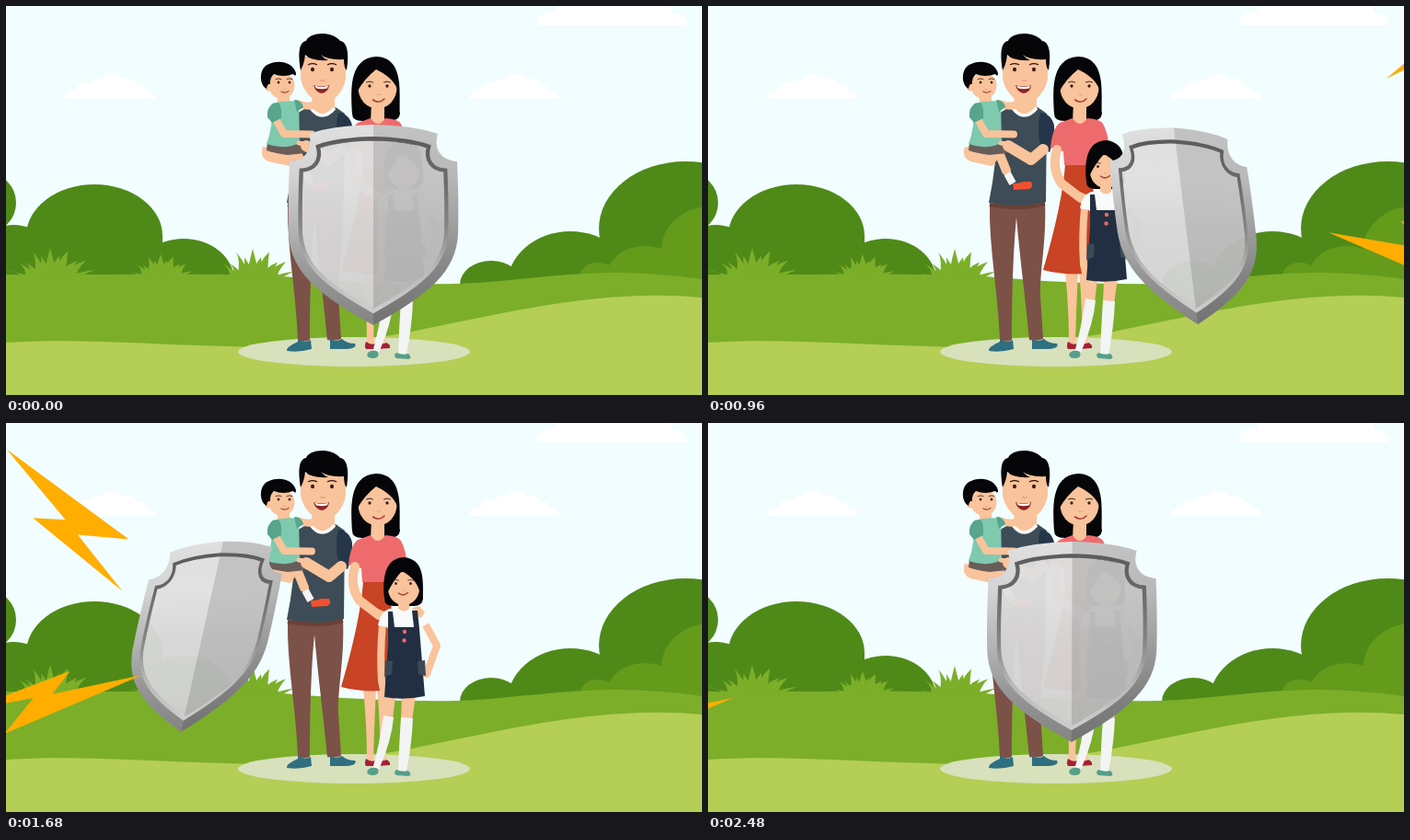
An HTML page with a canvas for the animation above (2.52 s loop, 756 by 423 pixels).

```html
<!DOCTYPE html>
<html lang="en">
<head>
<meta charset="utf-8">
<title>Family behind a shield</title>
<style>
html, body { margin: 0; width: 100%; height: 100%; overflow: hidden; background: #f1fdff; }
canvas { display: block; width: 756px; height: 423px; }
</style>
</head>
<body>
<canvas id="stage" width="756" height="423"></canvas>
<script>
const W = 756, H = 423, LOOP = 2520, STEP = 40;
const ctx = document.getElementById('stage').getContext('2d');
const scene = document.createElement('canvas');
scene.width = W;
scene.height = H;
const g = scene.getContext('2d');

const SKIN = '#f9c39b', BLACK = '#060608', WHITE = '#fcfdfd';
const BUSH = '#4f8a18', BUSH_LIGHT = '#659b1b', GRASS = '#7cae29', FIELD = '#b5ce56';

function shape(color, path) {
  g.fillStyle = color;
  g.fill(new Path2D(path));
}
function line(color, width, path, cap = 'round') {
  g.strokeStyle = color;
  g.lineWidth = width;
  g.lineCap = cap;
  g.lineJoin = 'round';
  g.stroke(new Path2D(path));
}
function oval(color, x, y, rx, ry = rx, turn = 0) {
  g.fillStyle = color;
  g.beginPath();
  g.ellipse(x, y, rx, ry, turn, 0, Math.PI * 2);
  g.fill();
}

// ---------- landscape ----------

function cloud(x, y, s) {
  g.save();
  g.translate(x, y);
  g.scale(s, s);
  shape('#fff', 'M-49 0C-49-7-43-10-37-9C-36-16-29-20-22-17C-19-22-14-23-10-21' +
    'C-6-29 9-29 14-21C20-25 28-20 30-15C35-17 39-13 39-8C45-9 49-5 49 0Z');
  g.restore();
}

function tuft(x, y, w, h) {
  for (let i = 0; i <= 10; i++) {
    const a = i / 5 - 1;
    const lift = h * (1 - 0.72 * a * a) * (i % 2 ? 1 : 0.72) + 4;
    const root = x + a * w * 0.5, tip = x + a * w;
    shape(GRASS, `M${root - 8} ${y}Q${root - 3 + a * 2} ${y - lift * 0.7} ${tip} ${y - lift}` +
      `Q${root + 5 + a * 4} ${y - lift * 0.5} ${root + 8} ${y}Z`);
  }
}

function landscape() {
  g.fillStyle = '#f1fdff';
  g.fillRect(0, 0, W, H);
  cloud(113, 101, 1);
  cloud(552, 101, 1);
  cloud(658, 21, 1.67);

  oval(BUSH, -22, 214, 33);
  oval(BUSH, 8, 284, 48, 46);
  oval(BUSH, 96, 250, 74, 56);
  g.fillStyle = BUSH;
  g.fillRect(22, 250, 148, 45);
  oval(BUSH, 193, 299, 55, 46);
  oval(BUSH, 527, 303, 34, 26);
  oval(BUSH, 613, 305, 69, 60);
  oval(BUSH, 738, 242, 94, 73);
  g.fillRect(645, 250, 111, 50);
  oval(BUSH_LIGHT, 643, 293, 19, 14);
  oval(BUSH_LIGHT, 694, 295, 42, 34);
  oval(BUSH_LIGHT, 770, 264, 58, 47);

  tuft(48, 297, 49, 30);
  tuft(168, 297, 34, 23);
  tuft(268, 299, 45, 31);
  shape(GRASS, 'M0 292C100 293 220 290 300 294C370 300 430 303 490 302' +
    'C550 300 590 291 660 290C700 290 735 294 756 297V423H0Z');
  shape(FIELD, 'M0 366C80 361 150 368 240 370C330 373 400 363 460 350' +
    'C540 334 600 320 670 316Q715 313 756 317V423H0Z');
  oval('#d8e1bc', 378, 376, 126, 16);
}

// ---------- people ----------

function face(x, y, gap, s) {
  for (const side of [-1, 1]) {
    oval('#3f1d17', x + side * gap, y, 1.8 * s, 2 * s);
    line('#2a1512', s, `M${x + side * gap - 4 * s} ${y - 4.5 * s}q${4 * s} ${-2.2 * s} ${8 * s} 0`);
  }
  line('#e2a37c', 1.1 * s, `M${x - 1.5 * s} ${y + 10 * s}q${2 * s} ${1.6 * s} ${4 * s} 0`);
}

function father() {
  shape('#7c5148', 'M306 215L366 213C368 255 360 290 361 315L364 362Q357 365 349 363' +
    'C346 330 339 275 335 230C331 270 330 325 330 363Q323 366 317 363C315 310 305 262 306 215Z');
  shape('#2f6f80', 'M317 362Q325 367 331 363L332 373Q318 377 305 375Q304 371 317 365Z');
  shape('#2f6f80', 'M352 362Q358 366 365 362Q370 367 379 367Q382 372 370 373L352 373Z');
  shape(SKIN, 'M333 92H357V112Q345 130 332 113Z');
  shape('#3d4c56', 'M330 110Q343 128 358 110L368 117L367 213Q337 221 305 214Q314 170 315 122Q317 113 330 110Z');
  line('#6a4037', 4, 'M306 216Q336 223 366 215', 'butt');
  line(WHITE, 3.5, 'M331 111Q343 127 357 111', 'butt');
  shape('#26364a', 'M361 116Q373 117 376 130Q377 145 371 159L361 154Q357 130 361 116Z');

  shape(SKIN, 'M320 55H369V76C369 90 356 106 345 106C334 106 320 90 320 76Z');
  shape(BLACK, 'M320 70C317 52 318 39 326 38C330 28 354 27 363 38C371 39 373 53 370 70' +
    'Q367 67 367 58Q349 59 342 53Q345 57 350 59Q331 60 325 53Q324 63 320 70Z');
  face(343.5, 69, 10.5, 1.15);
  shape('#8d2424', 'M334 86Q343 89 351 86Q350 94 343 95Q336 94 334 86Z');
  shape('#fff', 'M335 86.5Q343 89.5 350 86.5L349 89.5Q343 91 337 89.5Z');
}

function boy() {
  line(SKIN, 8, 'M316 106Q328 110 333 108');
  line(SKIN, 10, 'M283 158Q288 166 309 166');
  shape(SKIN, 'M279 153Q275 164 285 169L308 174Q315 171 310 166L300 160Z');
  line(SKIN, 10, 'M315 157L324 179');
  line('#f5f4f2', 8, 'M325 182L331 193', 'butt');
  shape('#f0502f', 'M331 193Q338 193 342 191L351 191Q354 197 349 199L332 200Z');
  shape('#685d59', 'M284 148L322 147Q328 153 325 160L306 162Q291 160 283 157Z');
  shape(SKIN, 'M295 97H308V105H295Z');
  shape('#7fc9af', 'M289 106Q304 102 318 104L319 149Q302 157 283 150Q290 132 289 106Z');
  shape('#56a58c', 'M313 102Q321 102 323 110L316 115Z');
  line(SKIN, 8, 'M293 123L302 139L332 139.5');
  shape('#56a58c', 'M290 106Q283 110 284 121L289 127L299 122Q300 110 296 105Z');

  oval(SKIN, 285, 88, 3.5, 4.5);
  oval(SKIN, 299.5, 86.5, 14, 14.5);
  shape(BLACK, 'M283 90C274 85 275 66 286 63C296 58 312 61 315 73Q315 78 312 74' +
    'Q301 78 291 74Q286 79 287 85Q284 84 283 90Z');
  face(302, 83, 6, 0.75);
  line('#a34835', 1.2, 'M299 93Q303 95.5 307 92.5');
}

function fatherArm() {
  line(SKIN, 12, 'M364 156L351 167L326 152');
  line(SKIN, 5, 'M329 151L318 149');
}

function mother() {
  shape(BLACK, 'M376 117C375 95 371 57 402 55C433 56 427 94 428 117Q427 125 416 125' +
    'H387Q376 125 376 117Z');
  shape(SKIN, 'M388 288H402Q400 330 399 367H392Q392 330 388 288Z');
  shape(SKIN, 'M403 288H414Q415 330 412 367H406Q407 330 403 288Z');
  shape('#a51f36', 'M391 365Q396 369 401 367L403 373H391Q389 370 391 365Z');
  shape('#a51f36', 'M404 365Q409 369 413 366Q418 368 417 372L404 373Z');
  shape('#c94325', 'M388 172H418L420 290Q390 294 364 287Q385 215 388 172Z');
  shape(SKIN, 'M397 105H411V125Q404 135 396 126Z');
  shape('#ee6b6d', 'M396 122Q404 134 412 122Q426 123 429 128Q434 138 435 148L419 154' +
    'L419 173H387L386 158L372 154Q374 133 382 127Z');
  line(SKIN, 10, 'M379 156Q373 177 384 193L405 209');
  shape(SKIN, 'M401 201L411 205L413 215L405 213Z');

  oval(SKIN, 403.5, 89, 21, 22.5);
  shape(BLACK, 'M381 94C379 72 386 58 403 60C419 59 429 73 426 94Q423 79 402 69Q389 79 381 94Z');
  face(404.5, 87, 9.5, 0.9);
  line('#a93c39', 1.6, 'M398.5 102Q405 107 411 101');
}

function daughter() {
  shape(SKIN, 'M411 297H423L420 322H410Z');
  shape(SKIN, 'M430 297H445L441 323H429Z');
  shape('#f3f4f4', 'M410 318L421 320Q419 345 405 377H398Q406 348 410 318Z');
  shape('#f3f4f4', 'M429 320L442 321Q441 348 435 379H426Q427 348 429 320Z');
  shape('#559f8a', 'M393 377Q398 373 404 376Q406 382 400 383Q390 383 393 377Z');
  shape('#559f8a', 'M424 377Q431 380 437 378Q442 383 437 384L424 383Q420 380 424 377Z');
  line(SKIN, 8, 'M409 219Q406 252 408 281L410 290');
  line(SKIN, 8, 'M454 216L468 242L457 273');
  shape(BLACK, 'M411 191C409 172 410 147 432 146C455 148 453 171 453 191Q452 199 443 199' +
    'H421Q411 199 411 191Z');
  shape(SKIN, 'M426 192H438V206H426Z');
  shape('#f8fafb', 'M416 202L427 202Q432 207 438 202L448 203Q456 208 460 217L450 223L446 215' +
    'L446 226H416L414 222L404 220Q406 206 416 202Z');
  shape(SKIN, 'M441 201L449 199L455 206L451 212L446 209Z');
  shape('#222f42', 'M415 205H420L422 222H443L441 204H447L449 224L455 297Q431 302 411 298L415 240Z');
  shape('#3b4a57', 'M412 258L420 259L419 273L411 276Z');
  shape('#3b4a57', 'M447 259L455 258L456 275L448 273Z');
  oval('#ee686c', 433, 227, 2.2);
  oval('#ee686c', 432.5, 236.5, 2.2);

  oval(SKIN, 432, 180, 17, 18);
  shape(BLACK, 'M414 185C411 164 417 150 432 150C448 150 453 165 450 186Q447 170 430 161Q421 171 414 185Z');
  face(431.5, 174.5, 8, 0.75);
  line('#a6423d', 1.5, 'M426.5 185Q431 189 436.5 184.5');
}

landscape();
father();
mother();
boy();
fatherArm();
daughter();

// ---------- moving parts ----------

const SHIELD = new Path2D('M0-109Q45-108 70-99C65-82 74-70 91-69Q93-25 92 10C90 50 62 75 0 109' +
  'C-62 75-90 50-92 10Q-93-25-91-69C-74-70-65-82-70-99Q-45-108 0-109Z');

function vertical(...stops) {
  const grad = ctx.createLinearGradient(0, -109, 0, 109);
  stops.forEach((c, i) => grad.addColorStop(i / (stops.length - 1), c));
  return grad;
}
const RIM = vertical('#e0e0e0', '#d3d3d3', '#b6b6b6', '#969696', '#848484');
const GROOVE = vertical('#5c5c5c', '#6c6c6c', '#858585', '#b8b8b8', '#cdcdcd');
const PANEL = vertical('#dedede', '#e0e0e0', '#d7d7d7', '#d4d4d4', '#cccccc');

// turn runs from -1 (facing left) to 1 (facing right)
function drawShield(x, y, turn) {
  const right = turn > 0, amount = Math.abs(turn);
  const squeeze = Math.cos(turn * (right ? 0.61 : 0.65));
  const height = 1 - amount * (right ? 0.02 : 0.05);
  ctx.save();
  ctx.transform(squeeze, turn * 0.038, turn * (right ? 0.12 : 0.21), height, x, y);
  // the rim is solid, the panel lets the scene show through faintly
  const panel = new Path2D();
  panel.addPath(SHIELD, new DOMMatrix().scale(0.84));
  const rim = new Path2D(SHIELD);
  rim.addPath(panel);
  ctx.fillStyle = RIM;
  ctx.fill(rim, 'evenodd');
  ctx.globalAlpha = 0.96;
  ctx.fillStyle = PANEL;
  ctx.fill(panel);
  ctx.globalAlpha = 1;
  ctx.save();
  ctx.clip(SHIELD);
  ctx.fillStyle = 'rgba(0,0,0,0.13)';
  ctx.fillRect(0, -115, 110, 230);
  ctx.restore();
  ctx.scale(0.86, 0.86);
  ctx.strokeStyle = GROOVE;
  ctx.lineWidth = 5;
  ctx.stroke(SHIELD);
  ctx.restore();
}

const BOLT = new Path2D('M0 0L160 41L121 1L199 0L76-25L100 1Z');

const smooth = u => u * u * (3 - 2 * u);
const linear = u => u;

function track(t, keys, ease) {
  if (t <= keys[0][0]) return keys[0][1];
  for (let i = 1; i < keys.length; i++) {
    const [t0, a] = keys[i - 1], [t1, b] = keys[i];
    if (t <= t1) return a + (b - a) * ease((t - t0) / (t1 - t0));
  }
  return keys[keys.length - 1][1];
}

// keys give [time, travel along the bolt's own axis]
const bolts = [
  { x: 602, y: 193, angle: -40.3, flip: 1,
    keys: [[200, 220], [360, 0], [440, -20], [680, -13], [1040, 230]] },
  { x: 577, y: 231, angle: 9, flip: 1,
    keys: [[480, 190], [680, 0], [800, 6], [1120, 190]] },
  { x: -21, y: 2, angle: 50.8, flip: -1,
    keys: [[1280, -200], [1400, 0], [1480, 55], [1720, 30], [1960, -200]] },
  { x: 104, y: 283, angle: 168.4, flip: -0.8,
    keys: [[1320, 120], [1400, 58], [1520, -45], [1760, -45], [2040, 0], [2480, 78], [2520, 110]] }
];

function drawBolt({ x, y, angle, flip, keys }, t) {
  if (t < keys[0][0] || t >= keys[keys.length - 1][0]) return;
  ctx.save();
  ctx.translate(x, y);
  ctx.rotate(angle * Math.PI / 180);
  ctx.translate(track(t, keys, linear), 0);
  ctx.scale(1, flip);
  ctx.fillStyle = '#ffae00';
  ctx.fill(BOLT);
  ctx.restore();
}

const CENTER = 399, RIGHT = 519, LEFT = 213;
const slide = [[0, CENTER], [485, RIGHT], [1154, RIGHT], [1474, LEFT], [2045, LEFT], [LOOP, CENTER]];
const rise = [[0, 238], [360, 240], [1400, 239], [2040, 222.5], [2480, 238]];

function render(t) {
  ctx.drawImage(scene, 0, 0);
  const x = track(t, slide, smooth);
  const offset = x - CENTER;
  drawShield(x, track(t, rise, smooth), offset / (offset > 0 ? RIGHT - CENTER : CENTER - LEFT));
  bolts.forEach(b => drawBolt(b, t));
}

const start = performance.now();
function tick() {
  const t = (performance.now() - start) % LOOP;
  render(Math.floor(t / STEP) * STEP);
  requestAnimationFrame(tick);
}
tick();
</script>
</body>
</html>
```
